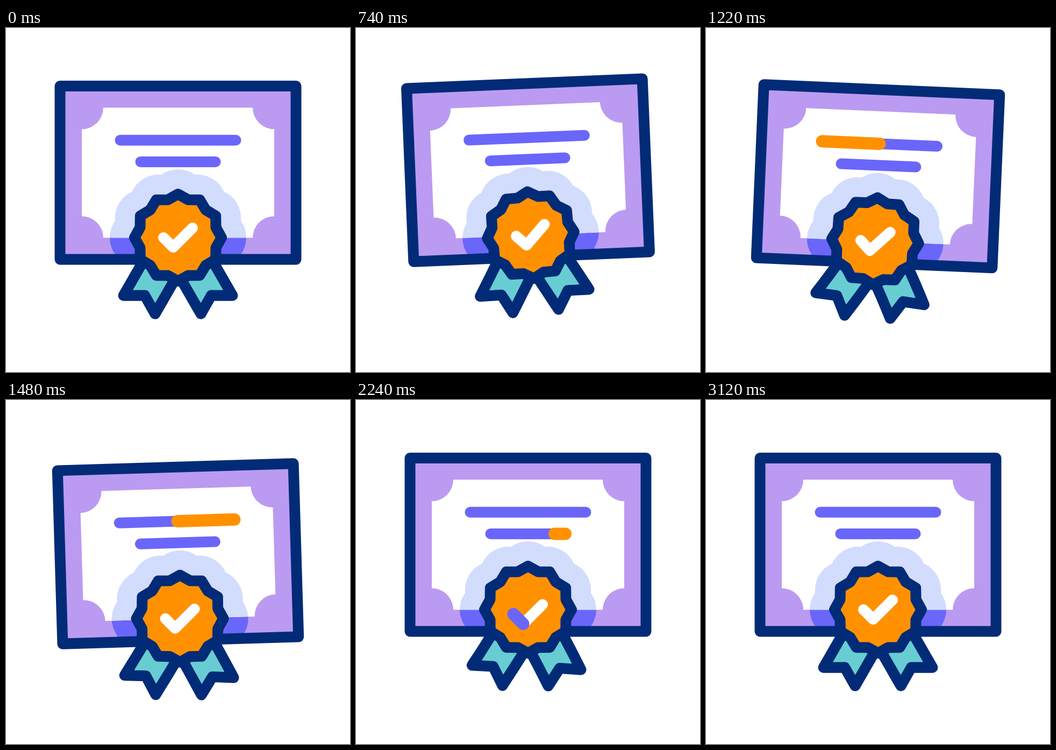
Write an HTML page with a canvas that moves like this. It is 640 by 640 pixels and loops after 3.22 s.

```html
<!DOCTYPE html>
<html>
<head>
<meta charset="utf-8">
<title>Certificate</title>
<style>
html, body { margin: 0; width: 100%; height: 100%; overflow: hidden; background: #fff; }
canvas { display: block; }
</style>
</head>
<body>
<canvas id="stage" width="640" height="640"></canvas>
<script>
const ctx = document.getElementById('stage').getContext('2d');
const NAVY = '#022b77', LILAC = '#bb9af2', BLUE = '#6a66fa', PALE = '#d2dcfd',
      ORANGE = '#ff9100', TEAL = '#68cdd2', WHITE = '#fff';
const LOOP = 3220, REST = 3120, RAD = Math.PI / 180;

// Keyframes are [time, value] pairs, eased in and out.
const DROP = [[0, 0], [460, 33], [960, -30.5], [1360, 21], [1780, 0]];
const TILT = [[240, 0], [640, -3], [1140, 3], [1540, -2], [1950, 0]];
const SPIN = [[0, 0], [500, -14.7], [990, 6.5], [1440, 0]];
const BEND = [[0, 0], [520, -6.5], [990, 10], [1400, 1.5], [1740, 4], [2100, 4], [2800, 0]];
const HOP = [[1980, 0], [2240, 8.5], [2520, -5], [2760, 0]];

const ease = u => { u = Math.min(1, Math.max(0, u)); return u * u * (3 - 2 * u); };

function at(keys, t) {
  return keys.slice(1).reduce((v, [t1, v1], i) => {
    const [t0, v0] = keys[i];
    return v + (v1 - v0) * ease((t - t0) / (t1 - t0));
  }, keys[0][1]);
}

function poly(points, closed) {
  const path = new Path2D();
  points.forEach(([x, y]) => path.lineTo(x, y));
  if (closed) path.closePath();
  return path;
}

const polar = (r, deg) => [r * Math.sin(deg * RAD), -r * Math.cos(deg * RAD)];

function paint(path, fill, stroke, width = 20) {
  if (fill) { ctx.fillStyle = fill; ctx.fill(path); }
  if (stroke) { ctx.strokeStyle = stroke; ctx.lineWidth = width; ctx.stroke(path); }
}

// Coordinates are relative to the certificate centre.
const frame = new Path2D();
frame.rect(-219.5, -161.2, 439, 322.4);

const paper = new Path2D();
[[-1, -1, 90, 0], [1, -1, 180, 90], [1, 1, 270, 180], [-1, 1, 360, 270]].forEach(([x, y, from, to]) =>
  paper.arc(x * 179, y * 121, 40, from * RAD, to * RAD, true));
paper.closePath();

const line1 = { path: poly([[-107.5, -60.5], [107.5, -60.5]]), length: 215 };
const line2 = { path: poly([[-69.5, -20.3], [69.5, -20.3]]), length: 139 };

// Coordinates are relative to the medal centre.
const star = poly(Array.from({ length: 24 }, (_, i) => polar(i % 2 ? 73 : 81, i * 15)), true);
const tick = { path: poly([[-27, 0], [-9, 18], [27, -18]]), length: 54 * Math.SQRT2 };

const halo = new Path2D();
for (let i = 0; i < 12; i++) {
  const a = (i * 30 - 90) * RAD, half = 36 * RAD;
  halo.arc(73.5 * Math.cos(a), 73.5 * Math.sin(a), 53.5, a - half, a + half);
}
halo.closePath();

function ribbon(bend) {
  const size = 144, k = bend * RAD / size;
  const point = (x, s) => {
    const a = k * s;
    const [cx, cy] = Math.abs(k) < 1e-6 ? [0, s] : [(Math.cos(a) - 1) / k, Math.sin(a) / k];
    return [cx + x * Math.cos(a), cy + x * Math.sin(a)];
  };
  const steps = [40, 60, 80, 100, 120, size];
  return poly([
    ...steps.map(s => point(-34, s)),
    point(0, 124),
    ...steps.reverse().map(s => point(34, s))
  ], true);
}

// A coloured run travels along a stroke: its head leaves first, its tail follows.
function sweep({ path, length }, color, t, head, tail, width) {
  const end = ease((t - head) / 560) * length, start = ease((t - tail) / 560) * length;
  if (end <= 0 || start >= length) return;
  ctx.setLineDash([Math.max(0.01, end - start), 2 * length]);
  ctx.lineDashOffset = -start;
  paint(path, null, color, width);
  ctx.setLineDash([]);
}

function draw(t) {
  const tilt = at(TILT, t) * RAD, y = 269.2 + at(DROP, t);
  const spin = at(SPIN, t) * RAD, bend = at(BEND, t);
  const card = () => { ctx.setTransform(1, 0, 0, 1, 320, y); ctx.rotate(tilt); };
  const medal = (turn = 0) => {
    ctx.setTransform(1, 0, 0, 1, 320 - 120.8 * Math.sin(tilt), y + 120.8 * Math.cos(tilt));
    ctx.rotate(spin + turn * RAD);
  };
  const area = (shape, fill, glow) => {
    ctx.save();
    card();
    paint(shape, fill);
    ctx.clip(shape);
    medal();
    paint(halo, glow);
    ctx.restore();
  };

  ctx.setTransform(1, 0, 0, 1, 0, 0);
  ctx.fillStyle = WHITE;
  ctx.fillRect(0, 0, 640, 640);
  ctx.lineCap = ctx.lineJoin = 'round';

  area(frame, LILAC, BLUE);
  area(paper, WHITE, PALE);
  card();
  paint(frame, null, NAVY);
  paint(line1.path, null, BLUE);
  paint(line2.path, null, BLUE);
  sweep(line1, ORANGE, t, 940, 1200, 23);
  sweep(line2, ORANGE, t, 1565, 1815, 23);

  for (const side of [30, -30]) {
    medal(side);
    paint(ribbon(bend), TEAL, NAVY);
  }
  medal();
  paint(star, ORANGE, NAVY);
  ctx.translate(0, at(HOP, t));
  paint(tick.path, null, WHITE);
  sweep(tick, BLUE, t, 2025, 2285, 23);
}

const begin = performance.now();
function tickFrame() {
  draw(Math.min(REST, (performance.now() - begin) % LOOP));
  requestAnimationFrame(tickFrame);
}
tickFrame();
</script>
</body>
</html>
```
